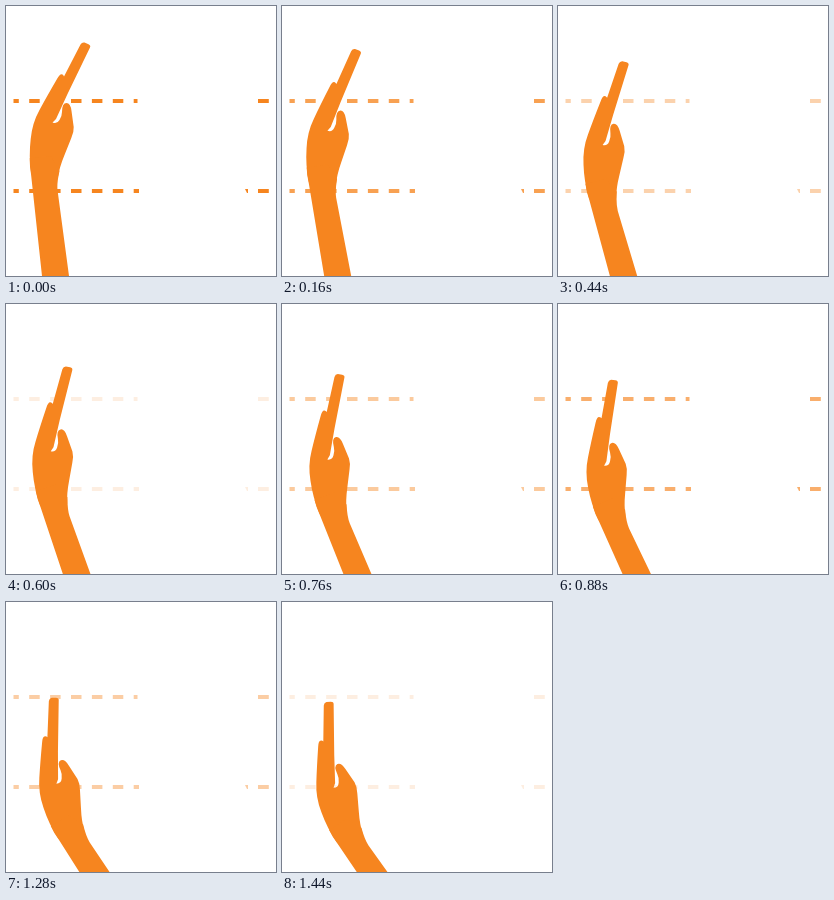
Write an HTML page that moves like this. It is 270x270 px and loops after 1.48 s.

```html
<!DOCTYPE html>
<html lang="en">
<head>
<meta charset="utf-8">
<title>Hand swipe</title>
<style>
  html, body { margin: 0; height: 100%; overflow: hidden; background: #fff; }
  svg { display: block; width: 100vw; height: 100vh; fill: #f6851f; }
  #dashes path { fill: none; stroke: #f6851f; stroke-width: 4; stroke-dasharray: 10.5 10.4; stroke-dashoffset: 5.2; }
</style>
</head>
<body>
<svg viewBox="0 0 270 270">
  <g id="dashes">
    <path d="M7.5 95H131.5"/>
    <path d="M7.5 185H133"/>
    <path d="M252 95h10.8M252 185h10.8" style="stroke-dasharray:none"/>
    <polygon points="239,183 242,183 242,187 241,187"/>
  </g>
  <g id="hand">
    <path d="M74.500 38.500Q76 36 78.500 36.500L82.500 38.200Q85 39.500 84 41.500
      L61.500 88L50 113L46.500 116.500Q51 118.500 53.500 114Q56 110 56 106
      Q56 97 60.500 97Q64.500 97 65.500 105L67.700 121Q68 126 65.300 132
      L58.500 149Q53.500 161 52 171Q45 185 38 184Q27 178 25 166
      Q22.700 150 24.700 133Q26.200 117 33.500 104Q40.500 91 51 73
      Q54.800 66 57.500 69.500L58 70.500Z"/>
    <path id="arm" d="M23.800 152Q23.500 160 25 168L36 270L43 335H72L63 270L51.500 184Q50.800 177 53.500 165L45 150Z"/>
  </g>
</svg>
<script>
const LOOP = 1480, STEP = 40, SPEED = 0.0195, BRAKE = 1280, STOP = 1440;
const FADE = [[0, 1], [600, 0.13], [1000, 0.88], [1440, 0.13]];
const [dashes, hand, arm] = ['dashes', 'hand', 'arm'].map(id => document.getElementById(id));

// Constant turn, then a linear slowdown to rest.
function turn(t) {
  const late = Math.max(0, t - BRAKE);
  return SPEED * (t - late * late / (2 * (STOP - BRAKE)));
}

function fade(t) {
  const i = Math.max(1, FADE.findIndex(([time]) => time >= t));
  const [t0, a] = FADE[i - 1], [t1, b] = FADE[i];
  return a + (b - a) * (t - t0) / (t1 - t0);
}

function draw(now) {
  const t = Math.floor(now % LOOP / STEP) * STEP;
  const angle = turn(t);
  hand.setAttribute('transform', `rotate(${-angle} 196 140.4)`);
  arm.setAttribute('transform', `rotate(${-0.05 * angle} 38 160)`);
  dashes.setAttribute('opacity', fade(t));
}

const start = performance.now();
function tick() {
  draw(performance.now() - start);
  requestAnimationFrame(tick);
}
tick();
</script>
</body>
</html>
```
